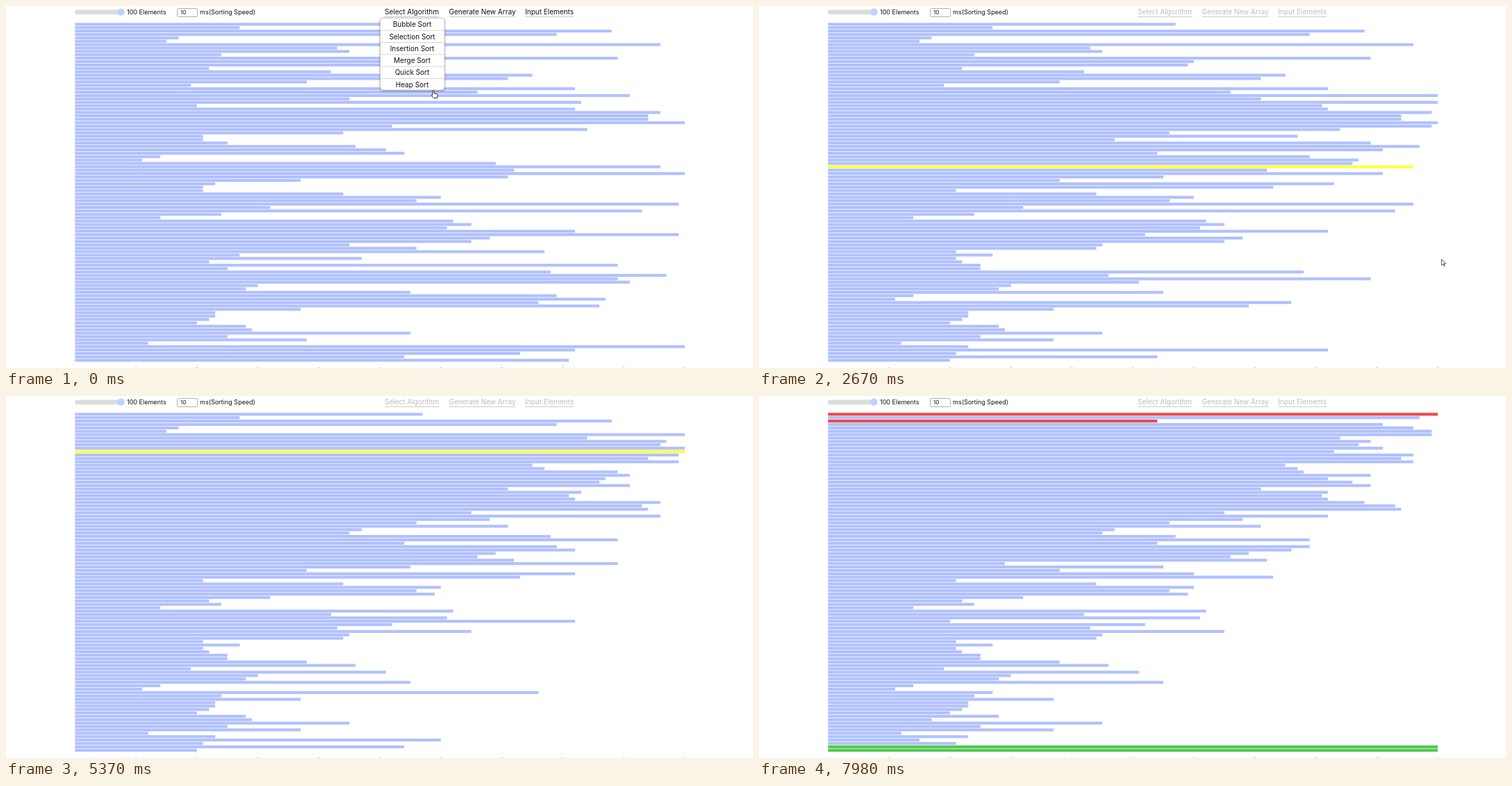
An HTML page that plays this animation: 1075x521 px, repeating every 8000 ms.

```html
<!DOCTYPE html>
<html lang="en">
<head>
<meta charset="utf-8">
<title>Heap sort</title>
<style>
html, body { margin: 0; width: 100%; height: 100%; overflow: hidden; background: #fff; }
svg { display: block; width: 1075px; height: 521px; }
text { font: 10px Inter, "Open Sans", sans-serif; fill: #111; }
.label { font-size: 9px; }
.mid { text-anchor: middle; }
.off text { fill: #bdbdbd; }
#menu rect { filter: drop-shadow(0 1px 1.5px #0006); }
</style>
</head>
<body>
<svg viewBox="0 0 1075 521">
  <rect x="99" y="5.4" width="70" height="6.8" rx="3.4" fill="#dcdcdc"/>
  <circle cx="165.5" cy="8.6" r="5.2" fill="#bcd2ff"/>
  <text class="label" x="174" y="12.2">100 Elements</text>
  <rect x="246.5" y="3.5" width="29" height="12" rx="2" fill="#fff" stroke="#999" stroke-width=".8"/>
  <text x="251" y="12.2" style="font-size:8px">10</text>
  <text class="label" x="279" y="12.2">ms(Sorting Speed)</text>
  <g id="bars"></g>
  <g id="ticks" fill="#888"></g>
  <g id="nav"></g>
  <g id="menu"><rect x="538.5" y="17.5" width="92.5" height="103.5" rx="4" fill="#fff" stroke="#bbb" stroke-width=".7"/></g>
  <path id="arrow" d="M0 0V8.6L2 6.8L3.5 9.8L4.9 9.1L3.5 6.3H6.2Z" fill="#fff" stroke="#333" stroke-width=".9"/>
  <path id="hand" d="M0 1Q1 -.4 2 1V4.6L6.4 5.6Q7.4 6 7.2 7L6.5 11.5H1.4L-1.8 7.4Q-1.6 6 0 7.2Z" fill="#fff" stroke="#222" stroke-width=".9"/>
</svg>
<script>
const LOOP = 8000, BLUE = '#b1c1ff', YELLOW = '#ffff42', RED = '#ea4b4b', GREEN = '#50c850';
const $ = id => document.getElementById(id);

function add(parent, tag, attrs, text = '') {
  const el = document.createElementNS('http://www.w3.org/2000/svg', tag);
  for (const k in attrs) el.setAttribute(k, attrs[k]);
  el.textContent = text;
  return parent.appendChild(el);
}

// Piecewise linear path through points [time, ...values]
function along(points, t) {
  if (t <= points[0][0]) return points[0].slice(1);
  const k = points.findIndex(p => p[0] > t);
  if (k < 0) return points[points.length - 1].slice(1);
  const [t0, ...from] = points[k - 1], [t1, ...to] = points[k];
  return from.map((v, i) => v + (to[i] - v) * (t - t0) / (t1 - t0));
}

const values = (
  '57 27 88 79 17 15 96 43 45 24 89 60 59 22 42 75 71 38 19 82 ' +
  '66 91 45 83 20 82 96 94 94 100 52 84 44 21 21 25 46 51 54 14 ' +
  '11 69 96 72 100 71 37 23 21 21 44 60 56 99 32 93 24 14 62 65 ' +
  '61 82 99 68 65 45 56 77 27 47 22 89 25 78 97 89 91 30 28 55 ' +
  '79 87 76 86 37 23 23 22 20 28 29 55 25 38 12 100 82 73 54 81'
).split(' ').map(Number);

// Heap sort recorded as equal steps
const steps = [];
let sortedFrom = 100;

function record(color, ...rows) {
  const marks = {};
  rows.forEach(r => marks[r] = color);
  steps.push({ values: [...values], marks, sortedFrom });
}

function swap(i, j) {
  record(RED, i, j);
  [values[i], values[j]] = [values[j], values[i]];
  record(RED, i, j);
  record(RED, i, j);
  record();
}

function heapify(n, i) {
  const l = 2 * i + 1, r = l + 1;
  if (l >= n) return;
  let top = i;
  for (const c of [l, r]) if (c < n && values[c] > values[top]) top = c;
  record(YELLOW, i);
  record(YELLOW, l);
  record(YELLOW, r < n ? r : l);
  record();
  if (top === i) return;
  swap(i, top);
  heapify(n, top);
}

record();
steps.length = 0;
const start = { values: [...values], marks: {}, sortedFrom };
for (let i = 49; i >= 0; i--) heapify(100, i);
for (let n = 99; n > 96; n--) {
  swap(0, n);
  sortedFrom = n;
  heapify(n, 0);
}

const pace = [[320, 0], [1720, 131.5], [2670, 218.5], [4220, 367.5],
  [5370, 477.5], [6980, 631.5], [7980, 733.5]];
const pointer = [[30, 614, 121], [300, 640, 150], [700, 680, 194], [1740, 680, 194],
  [2250, 826, 265], [2520, 982, 364], [3200, 983, 366], [3370, 988, 372],
  [3700, 1018, 425], [4240, 1018, 425], [4450, 1050, 530]];

const bars = values.map((_, i) =>
  add($('bars'), 'rect', { x: 99.3, y: 24.2 + 4.884 * i, height: 4.2 }));
for (let i = 1; i <= 10; i++)
  add($('ticks'), 'rect', { x: 98.8 + 87.75 * i, y: 520, width: 1, height: 1 });

[['Select Algorithm', 545, 623], ['Generate New Array', 638, 733], ['Input Elements', 747, 817]]
  .forEach(([name, x0, x1]) => {
    add($('nav'), 'text', { class: 'mid', x: (x0 + x1) / 2, y: 12.2 }, name);
    add($('nav'), 'path', { d: `M${x0} 15.5H${x1}`, stroke: '#ccc' });
  });
['Bubble', 'Selection', 'Insertion', 'Merge', 'Quick', 'Heap'].forEach((name, i) => {
  const y = 30.2 + 17.3 * i;
  add($('menu'), 'text', { class: 'mid', x: 584.5, y }, name + ' Sort');
  if (i < 5) add($('menu'), 'path', { d: `M539 ${y + 5}H631`, stroke: '#ccc', 'stroke-width': .8 });
});

function draw(t) {
  const open = t < 30;
  $('menu').style.display = $('hand').style.display = open ? '' : 'none';
  $('arrow').style.display = open ? 'none' : '';
  $('nav').setAttribute('class', open ? '' : 'off');

  // The screen refreshes every 50 ms
  const shift = t < 6770 ? 20 : 30;
  const shown = Math.floor((t - shift + 1) / 50) * 50 + shift;
  const [x, y] = along(pointer, shown);
  $(open ? 'hand' : 'arrow').setAttribute('transform', `translate(${x} ${y})`);

  const state = shown < pace[0][0] ? start : steps[Math.floor(along(pace, shown)[0])];
  bars.forEach((bar, i) => {
    bar.setAttribute('width', state.values[i] * 8.775);
    bar.setAttribute('fill', state.marks[i] || (i >= state.sortedFrom ? GREEN : BLUE));
  });
}

const began = performance.now();
function tick() {
  draw((performance.now() - began) % LOOP);
  requestAnimationFrame(tick);
}
tick();
</script>
</body>
</html>
```
